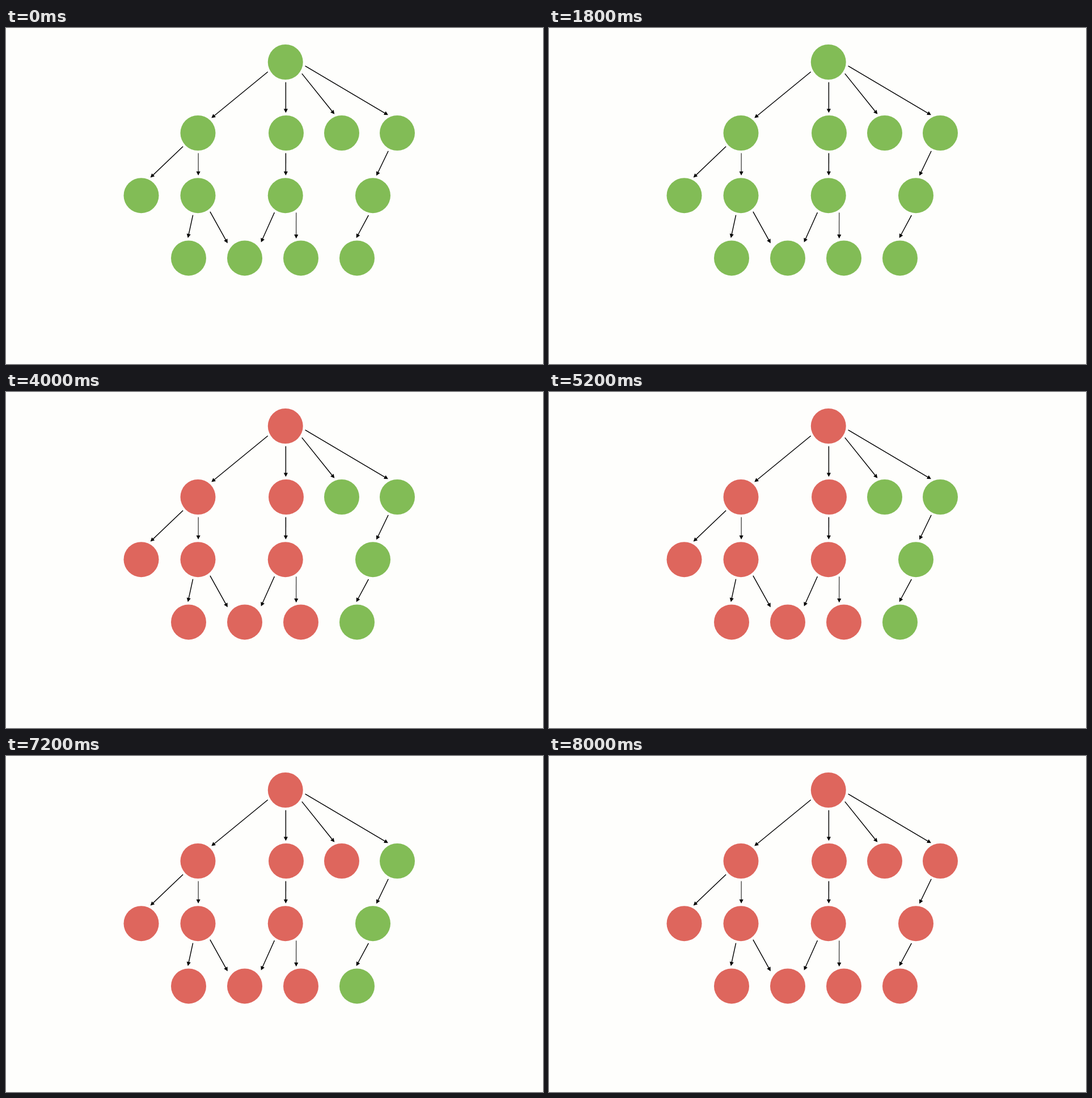
Write an HTML page that moves like this. It is 947x592 px and loops after 9000 ms.

```html
<!DOCTYPE html>
<html lang="en">
<head>
<meta charset="utf-8">
<title>Component tree</title>
<style>
  html, body { margin: 0; width: 100%; height: 100%; overflow: hidden; background: #fefefc; }
  svg { display: block; width: 100%; height: 100%; }
  text {
    font: 20.72px "Liberation Sans", Arial, sans-serif;
    text-rendering: geometricPrecision;
    fill: #111; stroke: #fefefc; stroke-width: 0.35px;
  }
</style>
</head>
<body>
<svg id="stage" viewBox="0 0 947 592"></svg>
<script>
const GREEN = "#82bc56", RED = "#de665d";
const LOOP = 9000, SPLIT_START = 3000, SPLIT_END = 4000;
const RADIUS = 31, SMALL_RADIUS = 17.5, GAP = 4.5, WIDE_GAP = 9;
const stage = document.getElementById("stage");

function add(parent, tag, attrs = {}) {
  const el = document.createElementNS("http://www.w3.org/2000/svg", tag);
  for (const key in attrs) el.setAttribute(key, attrs[key]);
  return parent.appendChild(el);
}

function circle(parent, cx, cy, r, fill = GREEN) {
  return add(parent, "circle", { cx, cy, r, fill });
}

function arrow(parent, x1, y1, x2, y2, width = 1.45) {
  const length = Math.hypot(x2 - x1, y2 - y1);
  const angle = Math.atan2(y2 - y1, x2 - x1) * 180 / Math.PI;
  const g = add(parent, "g", { transform: `translate(${x1} ${y1}) rotate(${angle})` });
  add(g, "path", { d: `M0 0H${length - 5}`, stroke: "#000", "stroke-width": width });
  add(g, "path", { d: `M${length} 0l-7 -3.6v7.2z` });
}

const nodes = [];
function node(x, y, turn = 0) {
  const n = { x, y, turn, gap: GAP, dot: circle(stage, x, y, RADIUS) };
  nodes.push(n);
  return n;
}

function row(count, x, step, y) {
  return Array.from({ length: count }, (_, i) => node(x + i * step, y));
}

// Bearings are degrees to the right: of straight down at the parent,
// of straight up at the child. A child turns red with its last parent.
function link(parent, out, child, into, width) {
  const port = (n, bearing, side) => {
    const a = bearing * Math.PI / 180, r = RADIUS + n.gap;
    return [n.x + r * Math.sin(a), n.y + side * r * Math.cos(a)];
  };
  arrow(stage, ...port(parent, out, 1), ...port(child, into, -1), width);
  child.turn = Math.max(child.turn, parent.turn);
}

const LEFT = 338.5, COLUMN = 154.25, TOP = 185, ROW = 110.2;
const root = node(LEFT + COLUMN, 60, 3000);
const branches = [node(LEFT, TOP), ...row(3, 494, 98, TOP)];
const inner = row(3, LEFT, COLUMN, TOP + ROW);
const leaf = node(LEFT - 100, TOP + ROW);
const bottom = row(4, 322, 99, TOP + 2 * ROW);
const shared = bottom[1];
shared.gap = WIDE_GAP;
[3000, 4000, 6000, 8000].forEach((time, i) => branches[i].turn = time);

link(root, -61, branches[0], 42);
link(root, 1, branches[1], -1);
link(root, 55, branches[2], -21);
link(root, 79, branches[3], -27);
link(branches[0], -48, leaf, 27);
link(branches[0], 1, inner[0], 1, 1);
link(branches[1], -1, inner[1], 1);
link(branches[3], -26.5, inner[2], 10);
link(inner[0], -14.5, bottom[0], -2);
link(inner[0], 37, shared, -49);
link(inner[1], -33, shared, 46);
link(inner[1], 32.5, bottom[2], -13.5, 1);
link(inner[2], -12.5, bottom[3], -2);

const split = add(stage, "g");
circle(split, 398.8, 401, SMALL_RADIUS, RED);
circle(split, 445.7, 398.5, SMALL_RADIUS);
arrow(split, 419, 497, 419, 428);
add(split, "text", { x: 287, y: 520.5 }).textContent = "2 versions of the same component";

function show(el, visible) {
  el.setAttribute("visibility", visible ? "visible" : "hidden");
}

function render(t) {
  const isSplit = t >= SPLIT_START && t < SPLIT_END;
  for (const { dot, turn } of nodes) dot.setAttribute("fill", t >= turn ? RED : GREEN);
  show(shared.dot, !isSplit);
  show(split, isSplit);
}

const start = performance.now();
function tick() {
  render((performance.now() - start) % LOOP);
  requestAnimationFrame(tick);
}
tick();
</script>
</body>
</html>
```
